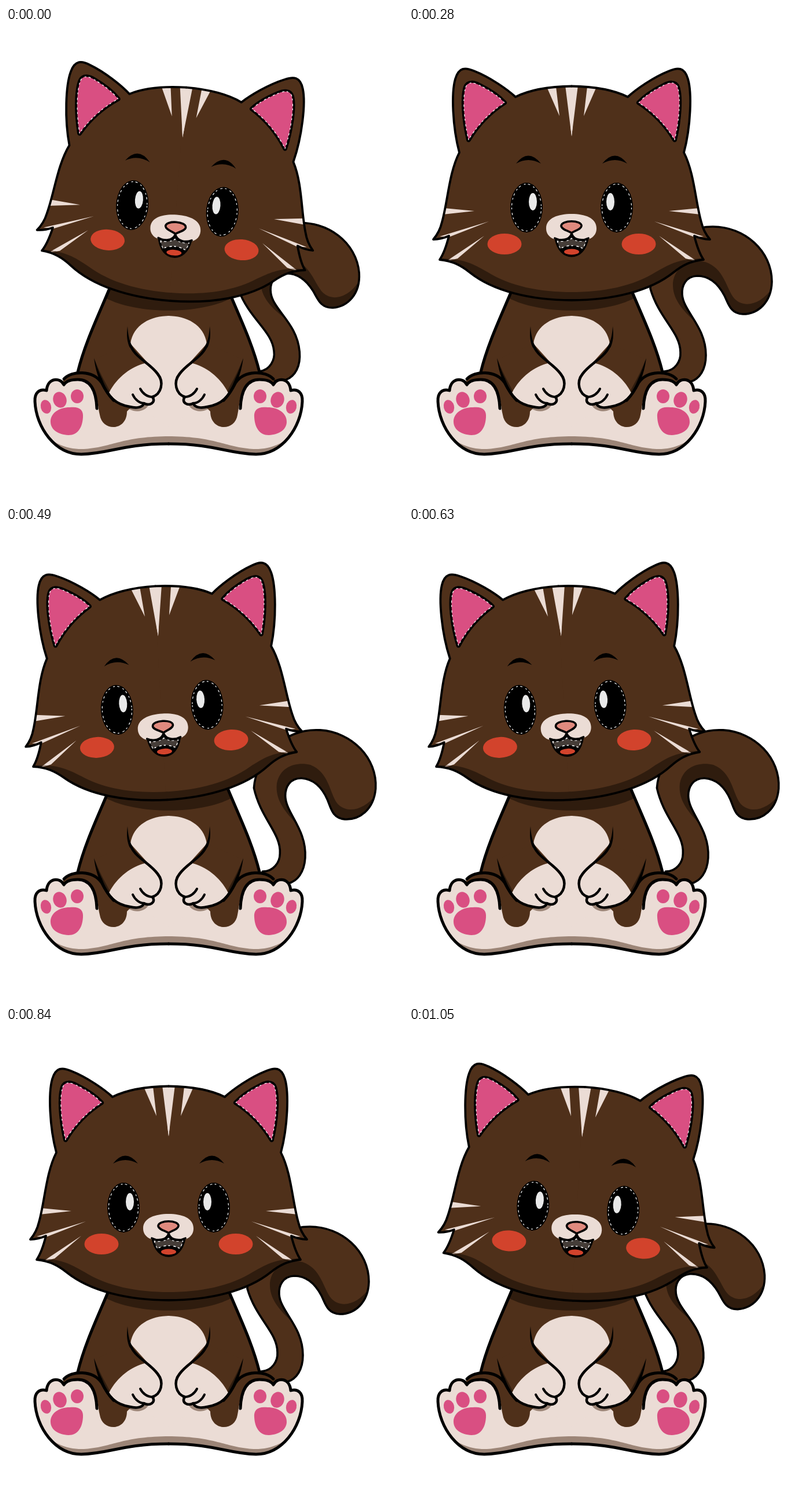
Write an HTML page with a canvas that moves like this. It is 686x815 px and loops after 1.12 s.

```html
<!DOCTYPE html>
<html lang="en">
<head>
<meta charset="utf-8">
<title>Sitting kitten</title>
<style>
  html, body { margin: 0; width: 100%; height: 100%; overflow: hidden; background: #fff; }
  canvas { display: block; }
</style>
</head>
<body>
<canvas id="stage" width="686" height="815"></canvas>
<script>
const ctx = document.getElementById('stage').getContext('2d');
const BROWN = '#4f301a', DARK = '#2f1c0e', CREAM = '#ebdcd5', TAUPE = '#9c8577';
const PINK = '#d94f82', RED = '#d2432c', NOSE = '#e08a7e';
const AXIS = 281;
const STEP = 70, STEPS = 16;

const p = d => new Path2D(d);
const fill = (path, color) => { ctx.fillStyle = color; ctx.fill(path); };

function line(path, width = 5, color = '#000') {
  ctx.lineWidth = width;
  ctx.strokeStyle = color;
  ctx.stroke(path);
}

function oval(x, y, rx, ry, color, tilt = 0) {
  ctx.beginPath();
  ctx.ellipse(x, y, rx, ry, tilt, 0, 7);
  ctx.fillStyle = color;
  ctx.fill();
}

function sparkle(path, width = 1.2) {
  ctx.setLineDash([2, 5, 3, 7]);
  line(path, width, '#fff');
  ctx.setLineDash([]);
}

function inside(path, draw) {
  ctx.save();
  ctx.clip(path);
  draw();
  ctx.restore();
}

// Draws the left side, then its mirror image
function both(draw) {
  draw();
  ctx.save();
  ctx.translate(2 * AXIS, 0);
  ctx.scale(-1, 1);
  draw();
  ctx.restore();
}

function turned(x, y, angle, draw) {
  ctx.save();
  ctx.translate(x, y);
  ctx.rotate(angle);
  ctx.translate(-x, -y);
  draw();
  ctx.restore();
}

const tail = p('M441 593C460 592 470 575 469 560C469 525 432 502 417 450C417 400 460 343 525 343' +
  'C580 343 627 385 627 438C626 475 602 494 577 494C555 493 552 476 545 462C535 443 520 428 498 428' +
  'C478 429 471 445 472 460C474 490 513 515 513 565C513 590 502 606 486 611L455 612Z');
const tailShade = p('M500 512C468 484 455 465 456 440C460 408 490 400 512 404C545 415 548 450 562 467' +
  'C580 486 612 476 630 445L640 510L540 510L500 440L478 460Z');

function drawTail() {
  fill(tail, BROWN);
  inside(tail, () => fill(tailShade, DARK));
  line(tail, 3.6);
}

const trunk = p('M178 452C158 500 136 545 124 594L124 640L438 640L438 594C426 545 404 500 384 452Z');
const flank = p('M178 452C158 500 136 545 124 594');
const neckShade = p('M172 466C225 495 337 495 390 466L380 440L180 440Z');
const toes = 'M157 657C156 630 148 607 124 607C110 607 103 611 100 616C94 603 72 603 70 626' +
  'C58 622 49 630 50 645C52 690 85 736 130 736C180 735 200 718 ';
const footLine = p(toes + '281 718');
const foot = p(toes + '283 718L283 600L209 600Z');
const footShade = p('M52 680C75 725 120 730 145 726C185 722 205 705 283 705V745H40Z');
const belly = p('M283 497C250 497 220 512 215 545C225 565 250 580 262 597C272 612 268 630 252 640L230 655L283 690Z');
const thigh = p('M98 606C112 590 150 590 165 612C180 640 195 650 215 656L209 662' +
  'C209 697 166 697 162 668C156 640 158 607 124 607C110 607 104 610 100 614Z');
const thighLine = p('M100 606C114 591 150 591 165 612C171 624 176 633 186 643');
const handShade = p('M205 650C215 668 247 664 247 646Z');
const arm = p('M153 572C168 632 186 655 222 655L255 640C270 625 272 610 262 597L215 545Z');
const armShade = p('M153 572C164 600 171 610 179 626L186 644C168 627 159 600 153 572Z');
const hand = p('M178 630C192 602 218 584 240 579C262 597 275 612 262 632L253 637' +
  'C260 647 248 653 238 648C236 657 222 656 215 654C200 651 186 642 178 630Z');
const armLine = p('M216 550C225 570 250 580 262 597C274 612 268 632 253 637C260 647 248 653 238 648' +
  'C236 657 222 656 214 654C190 650 176 638 164 607');
const armTips = p('M210 515C208 530 209 542 214 552L218 549C213 540 211 530 210 515Z' +
  'M152 570C154 585 157 597 162 609L166 606C160 594 157 584 152 570Z');
const fingers = p('M232 623C236 631 244 637 253 637M219 633C223 642 231 648 239 648');
const pad = p('M77 681C76 665 92 655 110 655C128 653 134 660 133 672C132 690 124 703 108 703C90 702 78 694 77 681Z');

function drawBody() {
  fill(trunk, BROWN);
  inside(trunk, () => fill(neckShade, DARK));
  both(() => line(flank));
  both(() => {
    fill(foot, CREAM);
    inside(foot, () => fill(footShade, TAUPE));
  });
  both(() => {
    fill(belly, CREAM);
    fill(handShade, TAUPE);
    fill(thigh, BROWN);
    fill(arm, BROWN);
    fill(armShade, DARK);
    fill(hand, CREAM);
    line(thighLine);
    line(footLine);
    fill(armTips, '#000');
    line(armLine, 4.5);
    line(fingers, 4);
    fill(pad, PINK);
    oval(69, 654, 9, 12, PINK, -0.25);
    oval(93, 642, 11.5, 14, PINK, -0.3);
    oval(123, 636, 11, 12, PINK);
  });
}

const edge = 'M281 100.5C245 101 210 106 184 119C170 106 140 85 112 74C98 68 86 67 80 88' +
  'C73 112 75 170 87 215C69 250 67 300 57 335C54 348 49 357 42 365C50 365 60 363 69 359' +
  'C65 375 60 390 53 400C75 402 90 410 105 422C145 454 210 470 281 470';
const headLine = p(edge);
const headHalf = p(edge + 'L283 470L283 100Z');
const chin = p('M50 398C95 398 110 407 135 421C175 446 225 456 283 456V480H40Z');
const ear = p('M103 193C95 160 92 120 98 102C102 92 112 94 122 99C140 108 155 118 165 129C140 145 118 168 103 193Z');
const marks = p('M270 99L283 99L283 170L281 187ZM239 104L254 101L260 152Z' +
  'M61 311L113 316L58 322ZM53 360L138 334L69 361ZM64 403L130 359L84 398Z');
const brow = p('M185 234Q206 207 228 234Q206 222 185 234Z');
const muzzle = p('M237 346C237 328 258 321 281 321C304 321 324 328 324 346C324 360 312 367 299 366' +
  'C290 365 284 361 281 357C278 361 272 365 263 366C250 367 237 360 237 346Z');
const nose = p('M263 342C263 331 299 331 298 342C297 348 286 350 281 354C275 350 264 348 263 342Z');
const lips = p('M252 363C262 368 277 367 281 355C285 367 300 368 310 363');
const mouth = p('M253 364C257 384 268 394 281 394C294 394 305 384 309 364C298 368 286 367 281 359C276 367 264 368 253 364Z');
const gums = p('M256 368C263 369 276 368 281 363C286 368 299 369 306 368L301 381C288 374 274 374 261 381Z');
const eyeRing = new Path2D();
eyeRing.ellipse(203, 310, 25.5, 40.5, 0, 0, 7);

function drawFace() {
  both(() => {
    fill(brow, '#000');
    oval(203, 310, 28, 43, '#000');
    sparkle(eyeRing);
    oval(214, 300, 7, 15, '#e9e9e9');
    oval(165, 373, 29.5, 18, RED);
  });
  fill(muzzle, CREAM);
  fill(mouth, '#000');
  fill(gums, '#453d38');
  sparkle(gums, 1.6);
  oval(281, 386.5, 13, 5, RED);
  line(mouth, 3);
  line(lips, 3.6);
  fill(nose, NOSE);
  line(nose, 3.6);
}

function drawHead() {
  both(() => fill(headHalf, BROWN));
  both(() => {
    inside(headHalf, () => {
      fill(marks, CREAM);
      fill(chin, DARK);
      inside(chin, () => fill(marks, TAUPE));
    });
    line(ear, 8);
    fill(ear, PINK);
    sparkle(ear);
  });
  both(() => line(headLine, 3.8));
  drawFace();
}

function draw(now) {
  const n = Math.floor(now / STEP) % STEPS;
  const sway = Math.min(n, STEPS - n) - 4;
  ctx.fillStyle = '#fff';
  ctx.fillRect(0, 0, 686, 815);
  ctx.lineCap = ctx.lineJoin = 'round';
  turned(440, 630, sway * 0.021, drawTail);
  drawBody();
  turned(267, 513, -sway * 0.0185, drawHead);
}

const start = performance.now();
function tick() {
  draw(performance.now() - start);
  requestAnimationFrame(tick);
}
tick();
</script>
</body>
</html>
```
